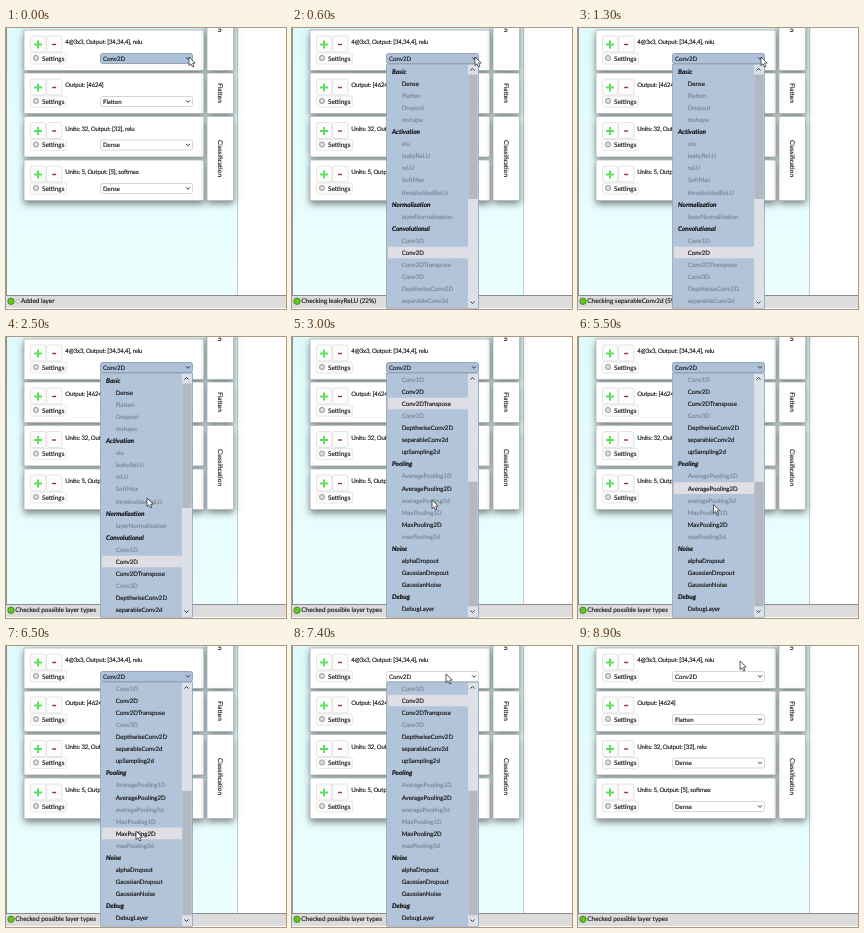
These frames come from a looping animation (280 by 281 pixels, 9000 ms). An HTML page with a canvas:

```html
<!DOCTYPE html>
<html lang="en">
<head>
<meta charset="utf-8">
<title>Layer editor</title>
<style>
html, body { margin: 0; width: 100%; height: 100%; overflow: hidden; background: #fff; }
canvas { display: block; width: 280px; height: 281px; }
</style>
</head>
<body>
<canvas></canvas>
<script>
const LOOP = 9000, W = 280, H = 281;
const OPEN = 200, CHECKED = 2000, CLOSE = 8900, ROW = 12.08;
const canvas = document.querySelector('canvas');
const ctx = canvas.getContext('2d');
const dpr = window.devicePixelRatio || 1;
canvas.width = W * dpr;
canvas.height = H * dpr;

const cards = [
  { y: 2, info: '4@3x3, Output: [34,34,4], relu', type: 'Conv2D' },
  { y: 45, info: 'Output: [4624]', type: 'Flatten' },
  { y: 88.5, info: 'Units: 32, Output: [32], relu', type: 'Dense' },
  { y: 132, info: 'Units: 5, Output: [5], softmax', type: 'Dense' }
];

// '#' marks a group heading, '+' a type that fits the network
const rows = ('#Basic +Dense Flatten Dropout reshape #Activation elu leakyReLU reLU SoftMax ' +
  'thresholdedReLU #Normalization layerNormalization #Convolutional Conv1D +Conv2D ' +
  '+Conv2DTranspose Conv3D +DepthwiseConv2D +separableConv2d +upSampling2d #Pooling ' +
  'AveragePooling1D +AveragePooling2D averagePooling3d MaxPooling1D +MaxPooling2D ' +
  'maxPooling3d #Noise +alphaDropout +GaussianDropout +GaussianNoise #Debug +DebugLayer')
  .split(' ').map(s => ({ name: s.replace(/^[#+]/, ''), head: s[0] === '#', fits: s[0] === '+' }));
const types = rows.filter(r => !r.head);

// [time, x, y] of the pointer tip
const pointer = [
  [0, 183, 29], [2100, 183, 29], [2500, 141, 161], [3000, 140, 163], [3600, 140, 162],
  [3900, 141, 150], [5100, 141, 150], [5900, 130, 185], [6850, 130, 185],
  [7400, 154, 28], [7800, 161, 13], [8200, 162, 15], [9000, 162, 15]
];
const scrolling = [[0, 0], [2550, 0], [2650, 74], [2750, 74], [2900, 170], [9000, 170]];
// [time, row] of the highlighted entry
const hovered = [[0, 15], [2650, 16], [3800, 23], [5700, 26], [7000, 23], [7100, 19], [7200, 15]];

function along(keys, t) {
  const i = Math.max(1, keys.findIndex(k => k[0] > t));
  const a = keys[i - 1], b = keys[i];
  const p = (t - a[0]) / (b[0] - a[0]), e = p * p * (3 - 2 * p);
  return a.slice(1).map((v, n) => v + (b[n + 1] - v) * e);
}

// A hairline outline gives the small type its medium weight
function text(s, x, y, size = 6.1, color = '#1a1a1a', opt = {}) {
  ctx.font = `${opt.style || ''} ${size}px Lato, "Open Sans", sans-serif`;
  ctx.letterSpacing = opt.gap || '0px';
  ctx.textAlign = opt.align || 'left';
  ctx.textBaseline = 'alphabetic';
  ctx.fillStyle = ctx.strokeStyle = color;
  ctx.lineWidth = 0.15;
  ctx.fillText(s, x, y);
  ctx.strokeText(s, x, y);
}

function box(x, y, w, h, fill, line, r = 0) {
  ctx.beginPath();
  ctx.roundRect(x, y, w, h, r);
  if (fill) { ctx.fillStyle = fill; ctx.fill(); }
  if (line) { ctx.strokeStyle = line; ctx.lineWidth = 0.7; ctx.stroke(); }
}

function disc(x, y, r, fill, line) {
  box(x - r, y - r, 2 * r, 2 * r, fill, line, r);
}

function stroke(color, width, ...pts) {
  ctx.beginPath();
  pts.forEach(p => ctx.lineTo(...p));
  ctx.strokeStyle = color;
  ctx.lineWidth = width;
  ctx.stroke();
}

function chevron(x, y, d, color = '#333') {
  stroke(color, 1, [x - 2, y - d], [x, y + d], [x + 2, y - d]);
}

function panel(x, y, w, h) {
  ctx.save();
  ctx.shadowColor = 'rgba(0,0,0,.5)';
  ctx.shadowBlur = 7 * dpr;
  ctx.shadowOffsetY = 3 * dpr;
  box(x, y, w, h, '#fff');
  ctx.restore();
  box(x, y, w, h, '#fff', '#aaa');
}

function card({ y, info, type }, active) {
  panel(18, y, 180, 40.5);
  box(24.5, y + 6, 15.5, 16, '#fcfcfc', '#d8d8d8', 2);
  box(40.5, y + 6, 15.5, 16, '#fcfcfc', '#d8d8d8', 2);
  stroke('#5ce05c', 2, [28, y + 14.5], [36, y + 14.5]);
  stroke('#5ce05c', 2, [32, y + 10.5], [32, y + 18.5]);
  stroke('#a02c2c', 1.4, [46.2, y + 14.5], [50, y + 14.5]);
  box(24.5, y + 23, 36, 11, '#fcfcfc', '#dedede', 2);
  disc(30, y + 28, 2.7, '#ccc', '#999');
  disc(30, y + 28, 1, '#eee');
  text('Settings', 36, y + 30.8, 6.4);
  text(info, 59.3, y + 14, 6.1, '#1a1a1a', { gap: '-0.15px' });
  box(94.5, y + 23.5, 92, 10, active ? '#adc1d9' : '#fff', active ? '#7d8b9c' : '#c4c4c4', 2);
  text(type, 97, y + 30.5);
  chevron(182, y + 28.3, 1);
}

function tab(label, y, h, mid) {
  panel(201, y, 26.5, h);
  ctx.save();
  ctx.translate(211.7, mid);
  ctx.rotate(Math.PI / 2);
  text(label, 0, 0, 6.4, '#1a1a1a', { align: 'center' });
  ctx.restore();
}

function page(active) {
  ctx.fillStyle = '#fff';
  ctx.fillRect(0, 0, W, H);
  const g = ctx.createLinearGradient(0, 0, 0, 268);
  g.addColorStop(0, '#dffafa');
  g.addColorStop(1, '#ecffff');
  ctx.fillStyle = g;
  ctx.fillRect(1, 0, 230.5, 268);
  stroke('#8a9292', 1, [0.5, 0], [0.5, 268]);
  stroke('#c2cccc', 1, [231.5, 0], [231.5, 268]);
  cards.forEach((c, i) => card(c, active && i === 0));
  tab('Convolution', -60, 102.5, -13);
  tab('Flatten', 45, 40.5, 65);
  tab('Classification', 88.5, 84, 130.5);
}

function status(t) {
  ctx.fillStyle = '#dcdcdc';
  ctx.fillRect(0, 268, W, 12);
  stroke('#8c8c8c', 1, [0, 267.5], [W, 267.5]);
  disc(5, 273.3, 3.2, '#63c81e', '#3c6a1c');
  if (t < OPEN) {
    disc(11.7, 273.3, 1.9, '#eee', '#aaa');
    text('Added layer', 15, 275.3, 6.4);
  } else if (t < CHECKED) {
    const n = Math.min(types.length, 1 + Math.floor((t - OPEN) / 70));
    text(`Checking ${types[n - 1].name} (${Math.round(n / types.length * 100)}%)`, 9.3, 275.3, 6.4);
  } else {
    text('Checked possible layer types', 9.3, 275.3, 6.4);
  }
}

function list(t) {
  const [offset] = along(scrolling, t);
  const chosen = hovered.filter(k => k[0] <= t).pop()[1];
  box(94.5, 36, 92, 244.3, '#b1c4d9', '#8d9dae');
  ctx.save();
  ctx.beginPath();
  ctx.rect(95, 36.5, 91, 243.5);
  ctx.clip();
  rows.forEach((r, i) => {
    const y = 43.5 + i * ROW - offset;
    if (y < 30 || y > 290) return;
    if (i === chosen) box(96, y - 6, 80, ROW - 0.5, '#dfdee5');
    if (r.head) {
      text(r.name, 100, y + 2.2, 6.45, '#0a0a0a', { style: 'italic bold' });
    } else {
      const on = r.fits && (t >= CHECKED || r.name === 'Dense' || r.name === 'Conv2D');
      text(r.name, 109.7, y + 2.2, 6.15, on ? '#141414' : '#7b8794');
    }
  });
  box(176, 36.5, 10, 245, '#dce1e7');
  box(176.3, 46.5 + offset * 0.578, 9.4, 124.5, '#b2b9c2');
  chevron(180.5, 41.5, -1);
  chevron(180.5, 274.5, 1);
  ctx.restore();
}

function arrow([x, y]) {
  ctx.save();
  ctx.translate(x, y);
  ctx.beginPath();
  [[0, 0], [0, 8.6], [2, 6.8], [3.5, 10], [5, 9.3], [3.6, 6.2], [6.2, 6]].forEach(p => ctx.lineTo(...p));
  ctx.closePath();
  ctx.fillStyle = '#fff';
  ctx.fill();
  ctx.strokeStyle = '#333';
  ctx.lineWidth = 0.8;
  ctx.stroke();
  ctx.restore();
}

function draw(now) {
  const t = now % LOOP;
  ctx.setTransform(dpr, 0, 0, dpr, 0, 0);
  ctx.textRendering = 'geometricPrecision';
  page(t < 7200);
  status(t);
  if (t >= OPEN && t < CLOSE) list(t);
  arrow(along(pointer, t));
  requestAnimationFrame(draw);
}
requestAnimationFrame(draw);
</script>
</body>
</html>
```
